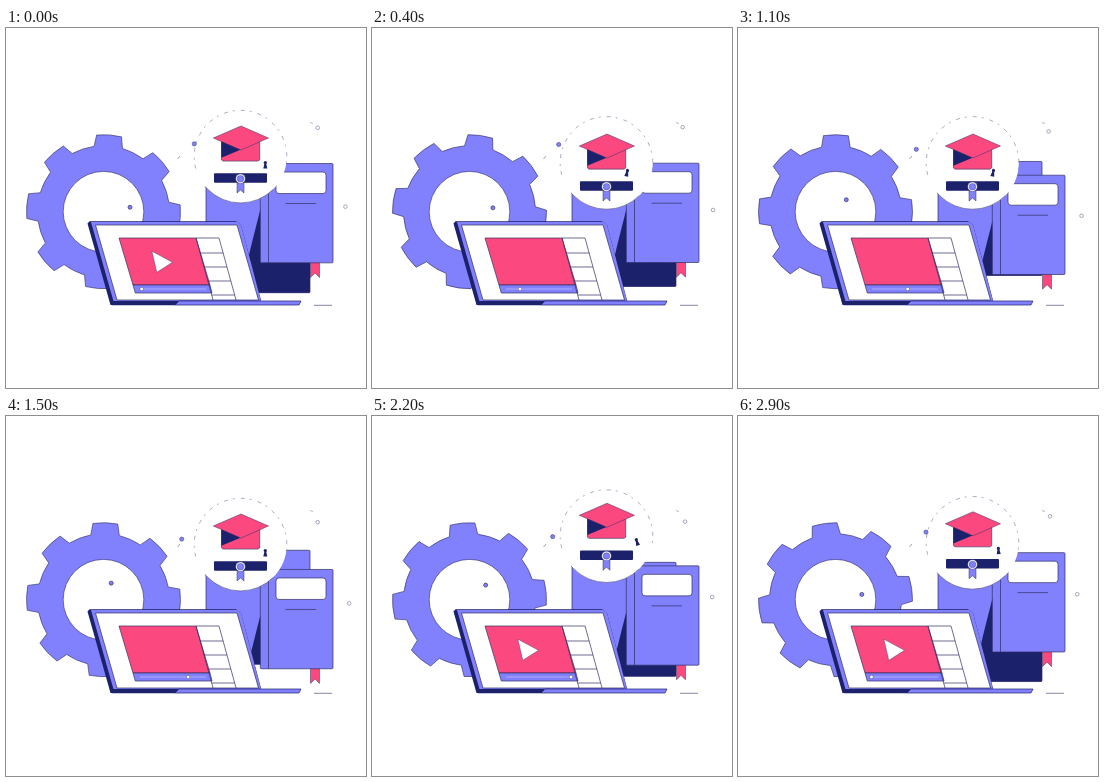
Animation, 360 px wide and 360 px high, one loop 3000 ms. Source, as an HTML page with a canvas:

```html
<!DOCTYPE html>
<html lang="en">
<head>
<meta charset="utf-8">
<title>Online learning</title>
<style>
html, body { margin: 0; width: 100%; height: 100%; overflow: hidden; background: #fff; }
canvas { display: block; width: 360px; height: 360px; }
</style>
</head>
<body>
<canvas id="stage"></canvas>
<script>
const LOOP = 3000, STEP = 100, TAU = Math.PI * 2, RAD = Math.PI / 180;
const PURPLE = '#8281fd', PINK = '#fb4980', NAVY = '#1c216b', INK = '#303063', WHITE = '#fff';

const canvas = document.getElementById('stage');
const ctx = canvas.getContext('2d');
const ratio = window.devicePixelRatio || 1;
canvas.width = canvas.height = 360 * ratio;
ctx.scale(ratio, ratio);

function paint(fill, stroke, width = 0.7) {
  if (fill) { ctx.fillStyle = fill; ctx.fill(); }
  if (stroke) { ctx.strokeStyle = stroke; ctx.lineWidth = width; ctx.stroke(); }
}

function poly(points, fill, stroke, width) {
  ctx.beginPath();
  points.forEach(([x, y]) => ctx.lineTo(x, y));
  ctx.closePath();
  paint(fill, stroke, width);
}

function line(x1, y1, x2, y2, color = INK, width = 0.7) {
  ctx.beginPath();
  ctx.moveTo(x1, y1);
  ctx.lineTo(x2, y2);
  paint(null, color, width);
}

function arc(x, y, r, from, to, color, width) {
  ctx.beginPath();
  ctx.arc(x, y, r, from * RAD, to * RAD);
  paint(null, color, width);
}

function disc(x, y, r, fill, stroke, width) {
  ctx.beginPath();
  ctx.arc(x, y, r, 0, TAU);
  paint(fill, stroke, width);
}

function box(x, y, w, h, r, fill, stroke, width) {
  ctx.beginPath();
  ctx.roundRect(x, y, w, h, r);
  paint(fill, stroke, width);
}

function ribbon(x, y, w, h, notch, fill, stroke) {
  poly([[x, y], [x + w, y], [x + w, y + h], [x + w / 2, y + h - notch], [x, y + h]], fill, stroke, 0.5);
}

// One sway per loop, largest at the given moment.
const sway = (t, mid, amp, peak) => mid + amp * Math.cos(TAU * (t - peak) / LOOP);

function gear(t) {
  const x = 97.5, y = 183.7;
  ctx.save();
  ctx.translate(x, y);
  ctx.rotate(TAU * t / LOOP + sway(t, 2.8, 2.4, 450) * RAD);
  ctx.beginPath();
  for (let i = 0; i < 8; i++) {
    const a = (i * 45 - 90) * RAD;
    ctx.arc(0, 0, 66, a - 32 * RAD, a - 12.5 * RAD);
    ctx.arc(0, 0, 77, a - 9.3 * RAD, a + 9.3 * RAD);
    ctx.lineTo(66 * Math.cos(a + 12.5 * RAD), 66 * Math.sin(a + 12.5 * RAD));
  }
  ctx.closePath();
  paint(PURPLE, INK, 0.6);
  ctx.restore();
  disc(x, y, 40.3, WHITE, INK, 0.6);
  disc(sway(t, 114.6, 9.4, 0), sway(t, 173.2, 7, 250), 2, PURPLE, INK);
}

function books(t) {
  const back = sway(t, 142.5, 9.5, 2750 - LOOP);
  const front = sway(t, 144.5, 10, 1720);

  ctx.save();
  box(200, back, 104, 114, 1, PURPLE, INK);
  ctx.clip();
  poly([[254.3, front + 46], [244.5, front + 85], [230, front + 150], [310, front + 150], [310, front + 46]], NAVY);
  ctx.restore();

  ribbon(304.5, front + 98, 9, 16, 4.5, PINK, INK);
  box(254.3, front, 72.7, 99.3, 1, PURPLE, INK);
  line(262.5, front, 262.5, front + 99.3);
  box(270, front + 8.5, 50, 21.5, 3, WHITE, INK);
  line(279.5, front + 40, 310, front + 40);
}

function tassel(x, y, tilt) {
  ctx.save();
  ctx.translate(x, y);
  ctx.rotate(tilt);
  disc(0, 1.5, 1.6, NAVY);
  poly([[-0.8, 2], [0.8, 2], [2, 7.5], [-2, 7.5]], NAVY);
  ctx.restore();
}

function badge(t) {
  const cx = 234.5;
  const cy = sway(t, 128.6, 8.5, 750);
  const top = sway(t, 98, 10.8, 750);
  const lean = sway(t, 0, 1, 750);

  disc(cx, cy, 46.3, WHITE);
  arc(cx, cy, 46.3, 45, 140, INK, 0.5);
  ctx.setLineDash([4, 5, 2, 6]);
  arc(cx, cy, 46.3, 165, 375, '#73739a', 0.6);
  ctx.setLineDash([]);

  poly([[215.5, top + 15], [253.7, top + 15], [253.7, top + 34], [252, top + 35.1], [217, top + 35.1], [215.5, top + 34]], PINK, INK, 0.6);
  poly([[215.3, top + 14], [234.5, top + 23.8], [215.3, top + 31.8]], NAVY);
  poly([[235, top], [262.5, top + 12], [235, top + 24], [207.3, top + 12]], PINK, INK, 0.5);
  tassel(259.3 - 4.6 * lean, top + 35, 0.3 * lean);

  const roll = top + 52;
  ribbon(231, roll + 2, 7, 13, 3, PURPLE, INK);
  box(208, roll - 4.8, 53, 9.6, 1, NAVY);
  disc(cx, roll + 0.7, 4.8, WHITE, INK, 0.4);
  disc(cx, roll + 0.7, 3.3, PURPLE, INK, 0.4);
}

function laptop(t) {
  poly([[83.5, 193.3], [230, 193.3], [235, 197], [256, 276], [104.5, 277], [81.5, 195.5]], NAVY);
  poly([[85, 194], [231, 194], [235, 197], [255.5, 275], [108, 275]], PURPLE);
  poly([[89.5, 197], [231, 197], [252.5, 272], [111, 272]], WHITE, INK);

  poly([[113, 210], [190, 210], [204, 257], [127, 257]], PINK, INK);
  poly([[127, 257], [204, 257], [206, 265], [129.3, 265]], PURPLE, INK);
  line(134, 261, 200, 261, '#b9b8ff', 0.8);
  // Playback starts just before the loop point and rests at the end.
  const played = 132.5 + 3.1 * ((t + 100) % LOOP) / 100;
  const knob = t > 2750 ? 133.5 : Math.min(199, played);
  disc(knob, 261, 1.8, WHITE, INK, 0.4);
  if (t < 200 || t >= 2100) poly([[145.9, 223.2], [166.5, 234.3], [150.8, 244.3]], WHITE, INK, 0.4);

  const slant = (x, y) => x + (y - 210) * 0.275;
  [190, 213].forEach(x => line(x, 210, slant(x, 272), 272));
  [210, 225, 239, 253, 267].forEach(y => line(slant(190, y), y, slant(213, y), y));

  poly([[104, 273], [173, 273], [169, 277.3], [106, 277.3]], NAVY);
  poly([[173, 273], [295, 273], [293, 277], [169, 277]], PURPLE, NAVY, 0.7);
  line(308, 277.3, 326, 277.3, INK, 0.6);
}

function specks(t) {
  disc(sway(t, 182, 6.3, 50), sway(t, 119.5, 3.7, 1600), 2.1, PURPLE, INK, 0.5);
  disc(sway(t, 311.7, 1.4, 2250), sway(t, 103, 4, 1800), 1.8, WHITE, '#6f6f92', 0.6);
  disc(sway(t, 341.3, 2.3, 1200), sway(t, 183, 5, 1250), 1.8, WHITE, '#6f6f92', 0.6);
  line(171.5, 131, 174, 128, '#77779c');
  line(304, 94.5, 307, 95.5, '#9a9ab2');
}

function draw() {
  const t = Math.floor((performance.now() % LOOP) / STEP) * STEP;
  ctx.fillStyle = WHITE;
  ctx.fillRect(0, 0, 360, 360);
  gear(t);
  books(t);
  badge(t);
  laptop(t);
  specks(t);
  requestAnimationFrame(draw);
}
draw();
</script>
</body>
</html>
```
